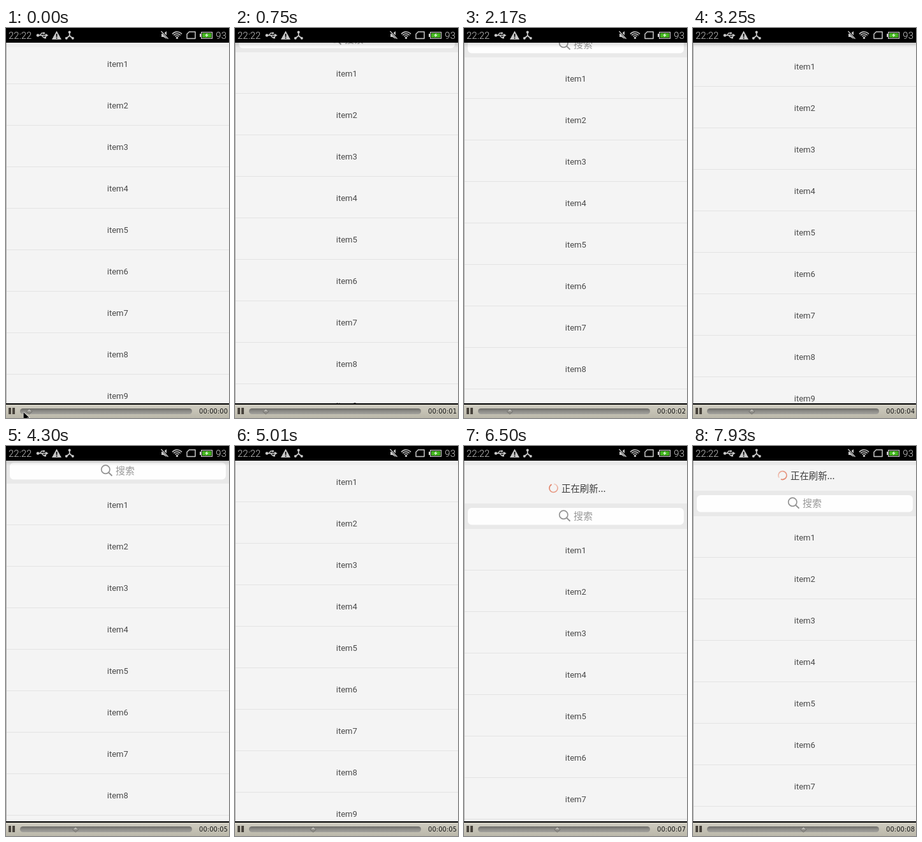
An HTML page with a canvas for the animation above (8000 ms loop, 350 px wide and 611 px high).

```html
<!DOCTYPE html>
<html lang="zh">
<head>
<meta charset="utf-8">
<title>Pull to refresh</title>
<style>
html, body { margin: 0; width: 100%; height: 100%; overflow: hidden; background: #000; }
canvas { display: block; width: 350px; height: 611px; }
</style>
</head>
<body>
<canvas id="stage" width="350" height="611"></canvas>
<script>
const ctx = document.getElementById('stage').getContext('2d');
const LOOP = 8000, TOP = 23, BOTTOM = 588, HEADER = 40, ROW = 65;
const CJK = '"Noto Sans CJK SC", "Noto Sans CJK", sans-serif';

// Header slides: start, end, number of steps, from, to
const slides = [
  [530, 1080, 9, -40, 0],
  [1860, 2480, 8, 0, -40],
  [3250, 3660, 6, -40, 0],
  [4250, 4690, 7, 0, -40],
  [5240, 5590, 6, -40, 0]
];
// Pull and settle: time, offset
const pull = [[6010, 0], [6200, 42], [6360, 92], [6430, 88], [6500, 67], [6650, 52], [6790, 47]];

function offsetAt(t) {
  if (t >= pull[0][0]) {
    const i = pull.findIndex(p => p[0] > t);
    if (i < 0) return 47;
    const [t0, a] = pull[i - 1], [t1, b] = pull[i];
    return Math.round(a + (b - a) * (t - t0) / (t1 - t0));
  }
  let y = -40;
  for (const [start, end, steps, from, to] of slides) {
    if (t < start) break;
    const step = Math.floor((t - start) / (end - start) * (steps - 1)) + 1;
    y = from + (to - from) * Math.min(1, step / steps) ** 1.25;
  }
  return Math.round(y);
}

function rect(x, y, w, h, color) {
  ctx.fillStyle = color;
  ctx.fillRect(x, y, w, h);
}

function round(x, y, w, h, r, color) {
  ctx.fillStyle = color;
  ctx.beginPath();
  ctx.roundRect(x, y, w, h, r);
  ctx.fill();
}

function poly(points, color) {
  ctx.fillStyle = color;
  ctx.beginPath();
  points.forEach(([x, y]) => ctx.lineTo(x, y));
  ctx.closePath();
  ctx.fill();
}

function line(points, color, width) {
  ctx.strokeStyle = color;
  ctx.lineWidth = width;
  ctx.beginPath();
  points.forEach(([x, y], i) => i ? ctx.lineTo(x, y) : ctx.moveTo(x, y));
  ctx.stroke();
}

function arc(x, y, r, from, to, color, width) {
  ctx.strokeStyle = color;
  ctx.lineWidth = width;
  ctx.beginPath();
  ctx.arc(x, y, r, from, to);
  ctx.stroke();
}

function dot(x, y, r, color) {
  ctx.fillStyle = color;
  ctx.beginPath();
  ctx.arc(x, y, r, 0, Math.PI * 2);
  ctx.fill();
}

function text(str, x, y, font, color, align = 'left') {
  ctx.font = font;
  ctx.fillStyle = color;
  ctx.textAlign = align;
  ctx.textBaseline = 'alphabetic';
  ctx.fillText(str, x, y);
}

function gradient(y0, y1, ...colors) {
  const g = ctx.createLinearGradient(0, y0, 0, y1);
  colors.forEach((c, i) => g.addColorStop(i / (colors.length - 1), c));
  return g;
}

function drawStatusBar() {
  const ink = '#c9c9c9';
  rect(0, 0, 350, TOP, '#000');
  text('22:22', 4, 17, '300 15px Roboto, sans-serif', ink);
  text('93', 346, 17, '300 15px Roboto, sans-serif', ink, 'right');

  // USB
  line([[49, 11.5], [63, 11.5]], ink, 1.6);
  line([[53, 11.5], [56, 8], [59, 8]], ink, 1.3);
  line([[56, 11.5], [59, 15], [61, 15]], ink, 1.3);
  dot(50, 11.5, 2.3, ink);
  dot(59.5, 8, 1.6, ink);
  rect(60, 13.5, 3, 3, ink);
  poly([[62, 8.8], [66.5, 11.5], [62, 14.2]], ink);

  // Warning
  poly([[79.5, 4.5], [87, 18], [72, 18]], ink);
  rect(78.7, 9, 1.7, 5, '#000');
  rect(78.7, 15, 1.7, 1.7, '#000');

  // Three-way fork
  line([[99.7, 6], [99.7, 12], [94.5, 16.5]], ink, 1.7);
  line([[99.7, 12], [105, 16.5]], ink, 1.7);
  [[99.7, 6.5], [94.8, 16], [104.8, 16]].forEach(([x, y]) => dot(x, y, 2, ink));

  // Muted speaker
  poly([[244, 9], [247, 9], [252, 5], [252, 17], [247, 14], [244, 14]], ink);
  line([[243.5, 4.5], [255, 17]], '#000', 3);
  line([[243.5, 5], [254.5, 17]], ink, 1.3);

  // Wi-Fi
  [4, 7, 10].forEach(r => arc(268.5, 16, r, -Math.PI * 0.77, -Math.PI * 0.23, ink, 1.6));
  dot(268.5, 15.5, 1.7, ink);

  // SIM
  ctx.lineJoin = 'round';
  line([[284, 16.5], [284, 9.5], [287.5, 6], [297, 6], [297, 16.5], [284, 16.5], [284, 9.5]], ink, 1.5);
  ctx.lineJoin = 'miter';

  // Battery
  ctx.strokeStyle = ink;
  ctx.lineWidth = 1.2;
  ctx.strokeRect(306.6, 6.6, 17, 9.8);
  rect(304, 9, 2.5, 5, ink);
  rect(308, 8, 14.3, 7, '#42b51d');
  poly([[316, 8], [312, 12], [314.6, 12], [313.5, 15], [318, 10.8], [315.5, 10.8]], '#e2f5da');
}

function drawSpinner(x, y, t) {
  const gap = (-100 + (t - 6500) * 0.4126) * Math.PI / 180;
  const g = ctx.createConicGradient(gap, x, y);
  g.addColorStop(0, '#f3d4ca');
  g.addColorStop(0.35, '#e9a08c');
  g.addColorStop(1, '#df7d63');
  arc(x, y, 6.5, gap + 0.25, gap + Math.PI * 2 - 0.3, g, 1.7);
}

function drawSearch(top) {
  rect(0, top, 350, HEADER, '#e9e9e9');
  round(6, top + 7, 339, 26.5, 6, '#fefefe');
  arc(156.3, top + 17.8, 6.6, 0, Math.PI * 2, '#929292', 1.7);
  line([[161, top + 22.5], [166.5, top + 27.7]], '#929292', 1.9);
  text('搜索', 172, top + 25, '15px ' + CJK, '#999');
}

function drawList(t) {
  const offset = offsetAt(t), top = TOP + offset;
  ctx.save();
  ctx.beginPath();
  ctx.rect(0, TOP, 350, BOTTOM - TOP);
  ctx.clip();
  rect(0, TOP, 350, BOTTOM - TOP, '#f4f4f4');

  if (offset >= 0) rect(0, TOP, 350, 7, '#e9e9e9');
  if (offset > 0) {
    drawSpinner(140.5, top - 24, t);
    text('正在刷新...', 153, top - 18.5, '14.4px ' + CJK, '#3c3c3c');
  }
  drawSearch(top);
  for (let i = 0; i < 9; i++) {
    const y = top + HEADER + i * ROW;
    text('item' + (i + 1), 175.3, y + 37.5, '13px Roboto, sans-serif', '#4a4a4a', 'center');
    rect(0, y + ROW - 1, 350, 1, '#e3e3e3');
  }
  if (offset <= -HEADER) rect(0, TOP, 350, 7, '#eeeeee');
  else if (offset < 0) rect(0, TOP, 350, 8, gradient(TOP, TOP + 8, 'rgba(0,0,0,.13)', 'rgba(0,0,0,0)'));
  rect(0, TOP, 1, BOTTOM - TOP, '#b0b0b0');
  ctx.restore();
}

function drawPlayer(t) {
  rect(0, BOTTOM, 350, 2, '#000');
  rect(0, 590, 350, 21, gradient(590, 611, '#d0cdc2', '#c5c2b5', '#bbb8aa'));
  rect(4, 595, 4, 10, '#49443d');
  rect(10, 595, 4, 10, '#49443d');
  round(22, 596, 270, 9, 4.5, gradient(596, 605, '#6c6b67', '#8d8c88', '#a3a29d'));

  // The knob advances in short ticks
  const tick = t < 290 ? 0 : 290 + Math.floor((t - 290) / 195) * 195;
  const x = 36.5 + tick * 0.01734;
  poly([[x - 5, 601], [x, 596.5], [x + 5, 601], [x, 605.5]], '#6b6a66');
  poly([[x - 4, 600.8], [x, 597.3], [x + 4, 600.8]], '#bbbab5');
  poly([[x - 4, 601.3], [x + 4, 601.3], [x, 604.7]], '#8f8e89');

  const seconds = Math.floor((t + 760) / 1000);
  text('00:00:0' + seconds, 348, 604, '10px "DejaVu Sans", sans-serif', '#171717', 'right');
}

function drawCursor(t) {
  if (t >= 110) return;
  const x = 27.5, y = t < 50 ? 602 : 606;
  const shape = [[0, 0], [0, 12], [3, 9.5], [5, 13], [7, 12], [5.2, 8.5], [9, 8.5]];
  const points = shape.map(([dx, dy]) => [x + dx, y + dy]);
  line([...points, points[0]], '#eee', 1.5);
  poly(points, '#000');
}

function frame(now) {
  const t = now % LOOP;
  drawList(t);
  drawStatusBar();
  drawPlayer(t);
  drawCursor(t);
  requestAnimationFrame(() => frame(performance.now() - start));
}

const start = performance.now();
frame(0);
</script>
</body>
</html>
```
